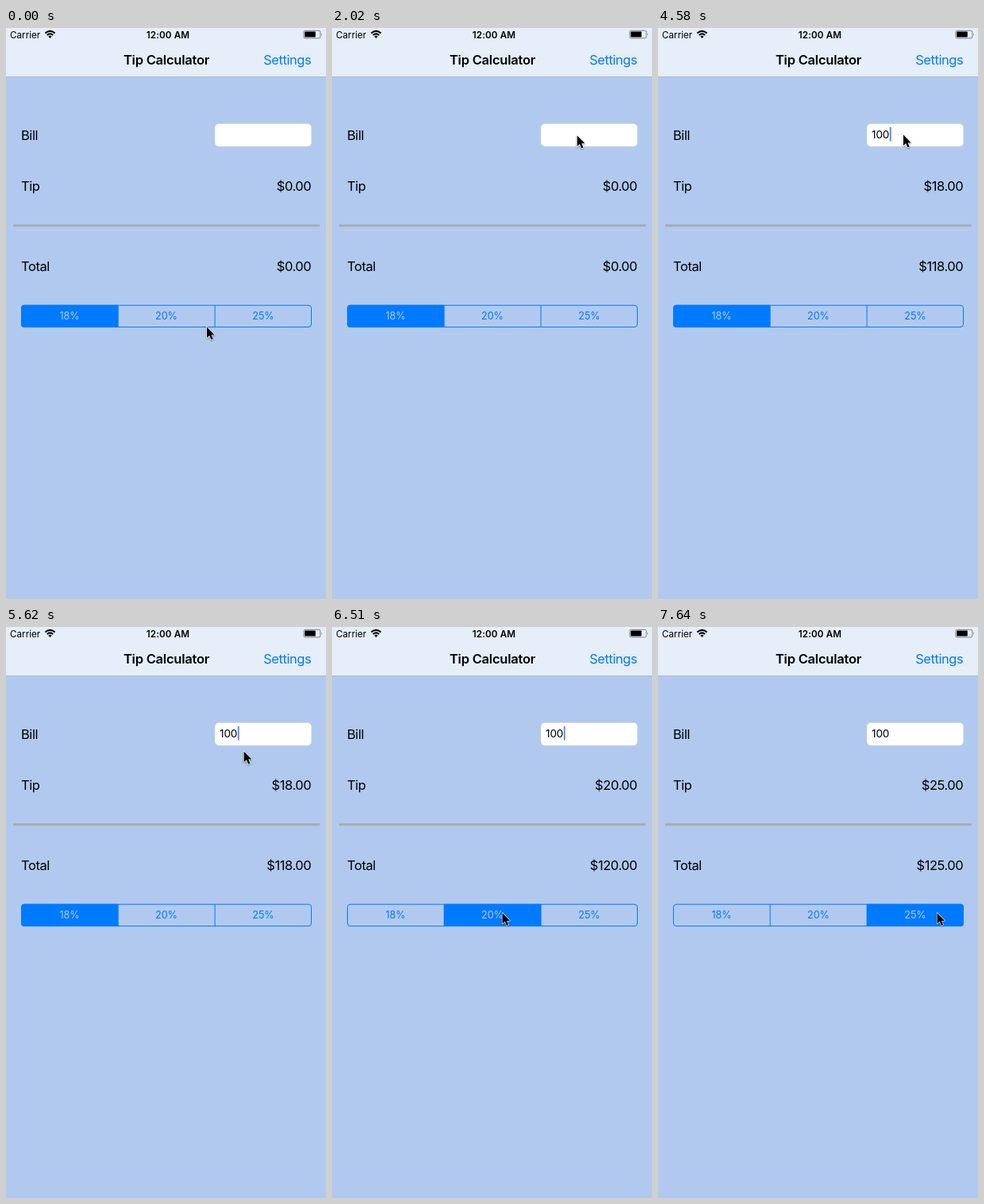
Write an HTML page that moves like this. It is 403 px wide and 719 px high and loops after 7990 ms.

```html
<!DOCTYPE html>
<html lang="en">
<head>
<meta charset="utf-8">
<title>Tip Calculator</title>
<style>
  html, body { margin: 0; width: 100%; height: 100%; overflow: hidden; background: #b1c9ee; }
  svg { display: block; width: 403px; height: 719px; }
  text { font-family: Inter, "Open Sans", sans-serif; font-size: 16.55px; letter-spacing: -.45px; }
  .end { text-anchor: end; }
  .mid { text-anchor: middle; }
  .status { font-size: 11.7px; letter-spacing: 0; }
  .title { font-weight: 600; letter-spacing: -.25px; }
  .field { font-size: 13.6px; letter-spacing: -.15px; }
  .seg text { font-size: 12.65px; letter-spacing: -.08px; fill: #007aff; }
  .seg rect { fill: #007aff; fill-opacity: 0; }
  .seg.press rect { fill-opacity: .16; }
  .seg.on rect { fill-opacity: 1; }
  .seg.on text { fill: #b1c9ee; }
</style>
</head>
<body>
<svg viewBox="0 0 403 719">
  <defs>
    <clipPath id="round"><rect x="19" y="348.7" width="366" height="28.4" rx="4"/></clipPath>
    <filter id="shade" x="-50%" y="-50%" width="200%" height="200%">
      <feDropShadow dx="0" dy="1" stdDeviation=".8" flood-opacity=".4"/>
    </filter>
  </defs>

  <rect width="403" height="719" fill="#b1c9ee"/>
  <rect width="403" height="61" fill="#e5eef9"/>
  <rect y="61" width="403" height=".7" fill="#a5b5cb"/>

  <text class="status" x="5" y="12.7">Carrier</text>
  <g fill="none" stroke="#000" stroke-width="2">
    <path d="M49.4 6.6 Q55.5 1.2 61.6 6.6"/>
    <path d="M51.7 9 Q55.5 5.8 59.3 9"/>
  </g>
  <path d="M53.3 10.6 Q55.5 8.9 57.7 10.6 L55.5 12.9 Z"/>
  <text class="status mid" x="204" y="12.7" font-weight="600" style="letter-spacing:.1px">12:00 AM</text>
  <rect x="374.9" y="3.3" width="21" height="9.6" rx="2" fill="none" stroke="#000" stroke-opacity=".45"/>
  <rect x="376.2" y="4.6" width="13.6" height="7" rx=".8"/>
  <path d="M397.2 6.4 q1.6 1.7 0 3.4 z" fill-opacity=".5"/>

  <text class="title mid" x="202" y="45.6">Tip Calculator</text>
  <text class="end" x="384.3" y="45.6" fill="#007aff">Settings</text>

  <text x="19" y="141.2">Bill</text>
  <text x="19" y="204.6">Tip</text>
  <text x="19" y="305.7">Total</text>
  <rect x="263" y="120.5" width="121.7" height="28.7" rx="4.8" fill="#fff" stroke="#c3d0e4" stroke-width=".5"/>
  <text class="field" id="bill" x="269" y="139"></text>
  <rect id="caret" y="124.8" width="1.9" height="18" rx=".8" fill="#3f69e4"/>
  <text class="end" id="tip" x="384.3" y="204.6"></text>
  <rect x="9" y="247.3" width="386" height="2.9" fill="#a9abae"/>
  <text class="end" id="total" x="384.3" y="305.7"></text>

  <g id="segs" clip-path="url(#round)"></g>
  <g fill="none" stroke="#007aff">
    <rect x="19.5" y="349.2" width="365" height="27.4" rx="3.6"/>
    <path d="M141.2 349V377M263.1 349V377"/>
  </g>

  <g id="pointer" filter="url(#shade)">
    <path d="M0 0V13.6L3.2 10.7L5.5 16L7.8 15L5.5 9.9H9.7Z" fill="#000" stroke="#fff" stroke-width="1.1" stroke-linejoin="round" paint-order="stroke"/>
  </g>
</svg>
<script>
const LOOP = 7990, FIRST = 980, LAST = 7640, TICK = 87.7;
const RATES = [18, 20, 25];
const $ = id => document.getElementById(id);
const clamp = v => Math.min(1, Math.max(0, v));
const money = v => '$' + v.toFixed(2);

$('segs').innerHTML = RATES.map((r, i) =>
  `<g class="seg"><rect x="${19 + i * 122}" y="348" width="122" height="30"/>` +
  `<text class="mid" x="${80 + i * 122}" y="367.4">${r}%</text></g>`).join('');
const segs = [...$('segs').children];

const easeIn = p => u => u ** p;
const easeOut = p => u => 1 - (1 - u) ** p;
const smooth = u => u * u * (3 - 2 * u);

// start, end, from, to, easing
const moves = [
  [892, 1320, [253, 376.5], [278, 243], easeIn(1.1)],
  [1320, 2020, [278, 243], [309, 134.5], easeOut(2.14)],
  [5372, 6240, [309, 134.5], [214.5, 360], smooth],
  [6773, 7030, [214.5, 360], [297.5, 355.5], easeIn(1.3)],
  [7030, 7290, [297.5, 355.5], [351.5, 360], easeOut(1.5)]
];

function pointerAt(t) {
  const [start, end, a, b, ease] = moves.filter(m => t >= m[0]).pop() || moves[0];
  const k = ease(clamp((t - start) / (end - start)));
  return a.map((v, i) => v + (b[i] - v) * k);
}

// Solid while typing, then a soft blink.
function caretAlpha(t) {
  if (t < 2345) return 0;
  const since = t < 3515 ? t - 2850 : t - 4520;
  if (since < 0) return 1;
  const p = since % 963;
  return p < 300 ? 1 - clamp((p - 20) / 190) : clamp((p - 440) / 160);
}

function draw(t) {
  const typed = [3515, 3775, 4045].filter(k => t >= k).length;
  const bill = '100'.slice(0, typed);
  const pick = t < 6500 ? 0 : t < 7460 ? 1 : 2;
  const press = t >= 7280 ? 2 : t >= 6320 ? 1 : 0;
  const tip = bill * RATES[pick] / 100;

  $('bill').textContent = bill;
  $('tip').textContent = money(tip);
  $('total').textContent = money(+bill + tip);
  $('caret').setAttribute('x', [269.4, 275, 283.5, 291.8][typed]);
  $('caret').setAttribute('opacity', caretAlpha(t));
  segs.forEach((s, i) => {
    s.classList.toggle('on', i === pick);
    s.classList.toggle('press', i === press && i !== pick);
  });
  $('pointer').setAttribute('transform', `translate(${pointerAt(t)})`);
}

const began = performance.now();
function frame() {
  const t = (performance.now() - began) % LOOP;
  const step = Math.floor((t - FIRST + 7) / TICK);
  draw(step < 0 ? 0 : Math.min(LAST, FIRST + step * TICK));
  requestAnimationFrame(frame);
}
frame();
</script>
</body>
</html>
```
